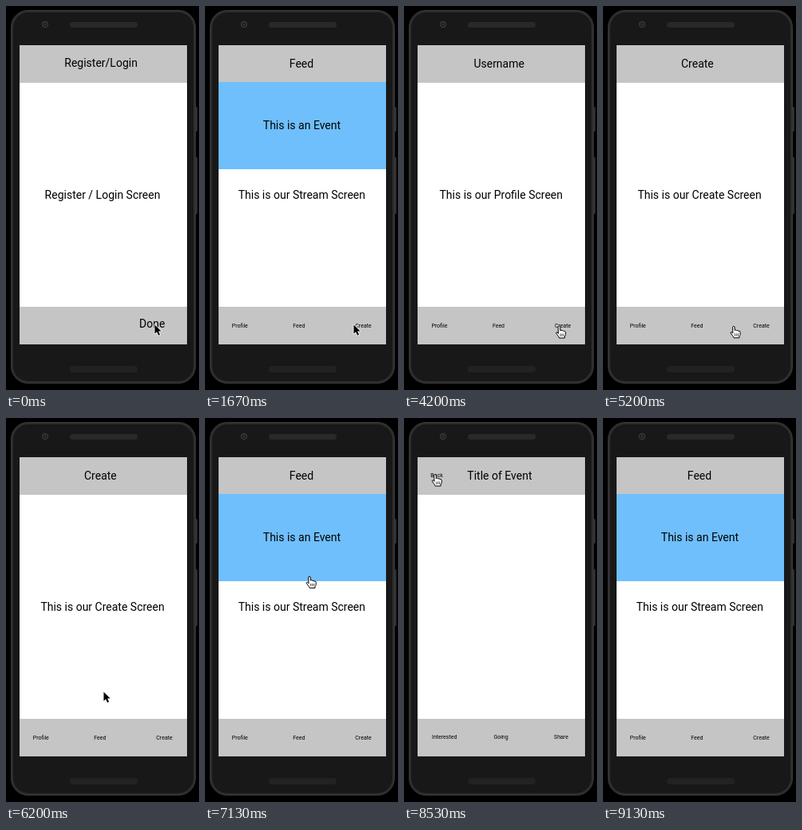
Recreate the animation shown at these times as an HTML page with a canvas. Size 242 by 480 pixels, loop 9.74 s.

```html
<!DOCTYPE html>
<html lang="en">
<head>
<meta charset="utf-8">
<title>App prototype</title>
<style>
html, body { margin: 0; width: 100%; height: 100%; overflow: hidden; background: #000; }
canvas { display: block; width: 242px; height: 480px; }
</style>
</head>
<body>
<canvas id="stage" width="242" height="480"></canvas>
<script>
const ctx = document.getElementById('stage').getContext('2d');
const LOOP = 9740;
const TICKS_PER_MS = 0.015;
const GREY = '#c5c5c5', BLUE = '#6fbffc';

// Each label: text, left edge, baseline, size
const nav = x => [['Profile', x, 402, 7], ['Feed', x + 76.5, 402, 7], ['Create', x + 154.5, 402, 7]];
const screens = {
  login: [['Register/Login', 73.3, 76, 14], ['Register / Login Screen', 48.6, 241, 14], ['Done', 167, 401.5, 14]],
  feed: [['Feed', 105.8, 77, 14], ['This is an Event', 72.8, 154, 14],
    ['This is our Stream Screen', 41.7, 241, 14], ...nav(33.8)],
  profile: [['Username', 87.4, 77, 14], ['This is our Profile Screen', 44.5, 241, 14], ...nav(34.4)],
  create: [['Create', 98, 77, 14], ['This is our Create Screen', 43.4, 241, 14], ...nav(33.8)],
  event: [['Title of Event', 79.3, 77, 14], ['Back', 33.3, 73.7, 7],
    ['Interested', 35, 401, 7], ['Going', 112.4, 401, 7], ['Share', 188, 401, 7]]
};

const cuts = [[0, 'login'], [25, 'feed'], [51, 'profile'], [71, 'create'],
  [94, 'feed'], [109, 'event'], [133, 'feed']];

// Pointer tip: tick, x, y, easing on the way here
const path = [
  [0, 186.5, 398.5], [31, 186.5, 398.5], [35, 112, 405, 'in'], [38, 29, 403, 'out'],
  [40, 40, 399, 'io'], [48, 40, 399], [49, 42.5, 398.5], [51, 42.5, 398.5],
  [63, 194.5, 400.5, 'io'], [74, 194.5, 400.5], [83, 121, 400, 'io'],
  [91, 121, 400], [93, 122.5, 342.5, 'in'], [100, 131, 198, 'out'],
  [108, 131, 198], [115, 23.5, 48.5, 'io'], [116, 23.5, 50.5], [120, 38, 71, 'out'],
  [126, 38, 71], [128, 39, 70.5], [133, 39, 70.5]
];
const shapes = [[0, 'arrow'], [62, 'hand'], [92, 'arrow'], [107, 'hand'], [109, 'arrow'], [120, 'hand'], [133, 'none']];

const ease = {
  in: p => p * p,
  out: p => 1 - (1 - p) ** 2,
  io: p => p * p * (3 - 2 * p)
};

const current = (list, tick) => list.filter(k => k[0] <= tick).pop()[1];

function pointerAt(tick) {
  const i = path.findIndex(k => k[0] > tick);
  if (i < 0) return path[path.length - 1].slice(1, 3);
  const [t0, x0, y0] = path[i - 1], [t1, x1, y1, kind] = path[i];
  let p = (tick - t0) / (t1 - t0);
  if (kind) p = ease[kind](p);
  return [x0 + (x1 - x0) * p, y0 + (y1 - y0) * p];
}

function rounded(x, y, w, h, r, fill, stroke, line = 1) {
  ctx.beginPath();
  ctx.roundRect(x, y, w, h, r);
  ctx.fillStyle = fill;
  ctx.fill();
  if (stroke) {
    ctx.strokeStyle = stroke;
    ctx.lineWidth = line;
    ctx.stroke();
  }
}

function rect(x, y, w, h, fill) {
  ctx.fillStyle = fill;
  ctx.fillRect(x, y, w, h);
}

function disc(x, y, r, fill) {
  ctx.beginPath();
  ctx.arc(x, y, r, 0, Math.PI * 2);
  ctx.fillStyle = fill;
  ctx.fill();
}

function drawPhone() {
  rect(0, 0, 242, 480, '#000');
  rounded(235, 126, 5, 31, 1.5, '#303030');
  rounded(235, 189, 5, 71, 1.5, '#303030');
  rounded(6.5, 5.5, 231, 466, 21, '#2d2d2d', '#393939');
  rounded(9, 8, 226, 461, 19, '#181818');
  rounded(80, 20, 85, 7, 3.5, '#292929');
  rounded(80, 450, 85, 8, 4, '#222');
  disc(49, 23, 4.3, '#353535');
  disc(49, 23, 2.6, '#1b1b1b');
  disc(49, 23, 1.2, '#3a3a3a');
}

function drawScreen(name) {
  const top = name === 'feed' ? 95 : 96;
  rect(17, 49, 210, 374, '#fff');
  rect(17, 49, 210, top - 49, GREY);
  rect(17, 376, 210, 47, GREY);
  if (name === 'feed') rect(17, 95, 210, 109, BLUE);
  ctx.fillStyle = '#000';
  for (const [text, x, y, size] of screens[name]) {
    ctx.font = `${size}px Roboto, sans-serif`;
    ctx.fillText(text, x, y);
  }
}

const arrow = new Path2D('M0 0V11.2L2.6 8.8L4.6 13.2L6.6 12.3L4.7 8H8.2Z');
const hand = new Path2D('M-1.3 .8Q0-.8 1.3 .8V5Q2.7 4.1 3.7 5.4Q5.2 4.7 6 6' +
  'Q7.9 5.4 8.2 7.2V10Q8 11.5 7 12.5V14.5H.2Q-.4 12.8-1.8 11.2L-3.6 8.8' +
  'Q-4 7.2-2.6 7.3L-1 8.8Z');
const fingers = new Path2D('M1.6 9V12.4M3.6 9V12.4M5.6 9V12.4');

function drawPointer(kind, x, y) {
  if (kind === 'none') return;
  ctx.save();
  ctx.translate(x, y);
  ctx.lineJoin = 'round';
  if (kind === 'arrow') {
    ctx.strokeStyle = '#fff';
    ctx.lineWidth = 1.6;
    ctx.stroke(arrow);
    ctx.fillStyle = '#000';
    ctx.fill(arrow);
  } else {
    ctx.fillStyle = '#fff';
    ctx.fill(hand);
    ctx.strokeStyle = '#000';
    ctx.lineWidth = 1;
    ctx.stroke(hand);
    ctx.lineWidth = 0.7;
    ctx.stroke(fingers);
  }
  ctx.restore();
}

const start = performance.now();

function frame() {
  const ms = (performance.now() - start) % LOOP;
  const tick = Math.floor((ms + 4) * TICKS_PER_MS);
  drawPhone();
  drawScreen(current(cuts, tick));
  drawPointer(current(shapes, tick), ...pointerAt(tick));
  requestAnimationFrame(frame);
}
frame();
</script>
</body>
</html>
```
